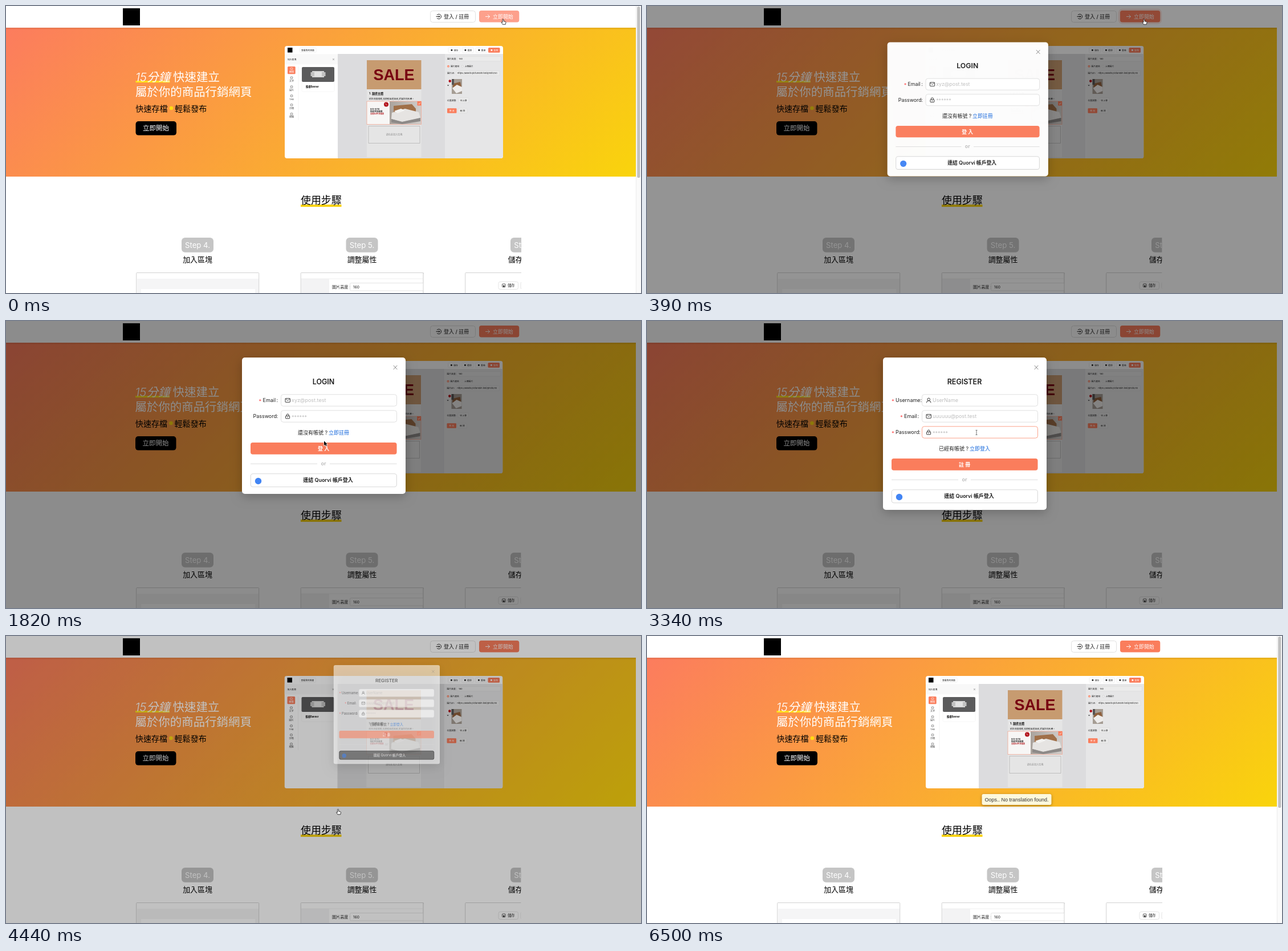
Recreate the animation shown at these times as an HTML page with a canvas. Size 1114x503 px, loop 8000 ms.

```html
<!DOCTYPE html>
<html lang="zh-Hant">
<head>
<meta charset="utf-8">
<title>Login and register</title>
<style>
html, body { margin: 0; width: 100%; height: 100%; overflow: hidden; background: #fff; }
canvas { display: block; width: 100%; height: 100%; }
</style>
</head>
<body>
<canvas id="stage" width="1114" height="503"></canvas>
<script>
const W = 1114, H = 503, LOOP = 8000;
const ctx = document.getElementById('stage').getContext('2d');
const SANS = 'Inter, "Noto Sans CJK TC", "Noto Sans CJK", sans-serif';
const ARIAL = '"Liberation Sans", Arial, sans-serif';
const CORAL = [250, 125, 92], WHITE = [255, 255, 255], GREY = [217, 217, 217], DARK = [51, 51, 51];
const LOCK_ON = 205, REGISTER_AT = 3010, CLOSE_AT = 4340, LOCK_OFF = 4590, TIP_AT = 4600;

const clamp = v => Math.max(0, Math.min(1, v));
const ramp = (t, from, len) => clamp((t - from) / len);
const hover = (t, on, off, len = 200) => Math.min(ramp(t, on, len), 1 - ramp(t, off, len));
const rgb = c => `rgb(${c.map(Math.round)})`;
const mix = (a, b, k) => rgb(a.map((v, i) => v + (b[i] - v) * k));

function rect(x, y, w, h, fill) {
  ctx.fillStyle = fill;
  ctx.fillRect(x, y, w, h);
}

function box(x, y, w, h, r, fill, stroke, lw = 0.8) {
  ctx.beginPath();
  ctx.roundRect(x, y, w, h, r);
  if (fill) { ctx.fillStyle = fill; ctx.fill(); }
  if (stroke) { ctx.strokeStyle = stroke; ctx.lineWidth = lw; ctx.stroke(); }
}

function dot(x, y, r, fill, stroke) {
  ctx.beginPath();
  ctx.arc(x, y, r, 0, 7);
  if (fill) { ctx.fillStyle = fill; ctx.fill(); }
  if (stroke) { ctx.strokeStyle = stroke; ctx.stroke(); }
}

// Each part is a flat list x, y, x, y, ...
function lines(color, lw, ...parts) {
  ctx.strokeStyle = color;
  ctx.lineWidth = lw;
  ctx.beginPath();
  for (const p of parts)
    for (let i = 0; i < p.length; i += 2) ctx[i ? 'lineTo' : 'moveTo'](p[i], p[i + 1]);
  ctx.stroke();
}

function poly(fill, ...p) {
  ctx.beginPath();
  for (let i = 0; i < p.length; i += 2) ctx.lineTo(p[i], p[i + 1]);
  ctx.closePath();
  ctx.fillStyle = fill;
  ctx.fill();
}

// y is the optical centre of the line
function text(s, x, y, size, color = '#222', weight = 400, align = 'left', family = SANS) {
  ctx.font = `${weight} ${size}px ${family}`;
  ctx.textAlign = align;
  ctx.fillStyle = color;
  ctx.fillText(s, x, y + size * 0.37);
}

function arrowIcon(x, y, color) {
  lines(color, 0.9, [x, y, x + 7.5, y], [x + 4.2, y - 3.3, x + 7.5, y, x + 4.2, y + 3.3]);
}

function drawHeader(t) {
  rect(0, 0, 1105, 38, '#fff');
  box(205, 4, 30, 30, 0, '#000');

  box(744.5, 8.5, 79, 20, 4, '#fff', '#d9d9d9');
  ctx.strokeStyle = '#222';
  ctx.lineWidth = 1;
  ctx.beginPath();
  ctx.arc(759.3, 18.5, 4.2, -2.5, 2.5);
  ctx.stroke();
  lines('#222', 1, [754.5, 18.5, 761, 18.5], [759, 16.5, 761, 18.5, 759, 20.5]);
  text('登入 / 註冊', 768, 19, 9, '#222', 500);

  const wave = ramp(t, 70, 800);
  if (wave > 0 && wave < 1) {
    const g = 3.5 * ramp(t, 70, 350);
    box(830 - g, 8 - g, 70 + 2 * g, 20.5 + 2 * g, 4 + g, `rgba(250,125,92,${0.3 * (1 - wave)})`);
  }
  box(830, 8, 70.3, 20.5, 4, mix([253, 160, 140], CORAL, ramp(t, 70, 300)));
  arrowIcon(841, 18.5, '#fff');
  text('立即開始', 854, 19, 8.96, '#fff', 500);
}

function drawHero() {
  const g = ctx.createLinearGradient(211, -173, 894, 510);
  g.addColorStop(0, '#fc7c5e');
  g.addColorStop(1, '#f9d40c');
  rect(0, 38, 1105, 261, g);
  const shade = ctx.createLinearGradient(0, 38, 0, 42);
  shade.addColorStop(0, 'rgba(90,40,0,.16)');
  shade.addColorStop(1, 'rgba(90,40,0,0)');
  rect(0, 38, 1105, 4, shade);
}

function drawHeroText() {
  rect(227.5, 131, 60, 3.2, '#ffe01c');
  text('15', 227, 124, 20.5, '#fff', 'italic 300');
  text('分鐘', 247, 124, 20.5, '#fff', 'italic 300');
  text('快速建立', 293, 124, 20.5, '#fff');
  text('屬於你的商品行銷網頁', 227, 150, 20.45, '#fff');
  text('快速存檔', 227.3, 180, 14.1, '#000');
  dot(290, 179, 3.3, '#ffdb13');
  text('輕鬆發布', 296, 180, 14.1, '#000');
  box(227.5, 202, 71.5, 24.6, 5, '#000');
  text('立即開始', 263, 214, 11.5, '#fff', 500, 'center');
}

function drawBed() {
  const wall = ctx.createLinearGradient(673, 0, 729, 0);
  wall.addColorStop(0, '#aaa39d');
  wall.addColorStop(1, '#d2cecb');
  rect(673, 167, 55.5, 40, wall);
  poly('#a06f48', 680, 175, 712, 172, 719, 180, 719, 188, 680, 189);
  poly('#e6e4e2', 677, 187, 700, 180, 724, 186, 727, 196, 695, 203, 676, 198);
  poly('#8d8a88', 676, 198, 695, 203, 727, 196, 727, 202, 695, 207, 676, 204);
  poly('#f3f2f0', 681, 184, 693, 180, 700, 183, 687, 188);
}

function drawEditor() {
  ctx.save();
  ctx.beginPath();
  ctx.roundRect(489, 70, 383, 197, 4);
  ctx.clip();
  rect(489, 70, 383, 197, '#fff');
  rect(582, 84, 188, 183, '#dcdcde');
  rect(770, 84, 102, 183, '#e6e6e7');

  box(494, 73, 8.5, 8.5, 0, '#000');
  box(515.5, 73, 28.5, 8.5, 1.5, '#fff', '#e6e6e6', 0.5);
  text('查看我的頁面', 518, 77.3, 3.8, '#111', 500);
  [[776, '儲存'], [800, '還原'], [824, '重做'], [846, '發布']].forEach(([x, s], i) => {
    const main = i === 3, ink = main ? '#fff' : '#222';
    box(x, 73, 20.5, 8.7, 1.5, main ? rgb(CORAL) : '#fff', main ? '' : '#e2e2e2', 0.5);
    box(x + 4.5, 76, 2.8, 2.8, 0.7, ink);
    text(s, x + 9.5, 77.4, 3.9, ink, 500);
  });

  rect(489, 84.3, 93, 18, '#f8f8f8');
  text('加入區塊', 494, 93.3, 3.8, '#111', 500);
  lines('#777', 0.6, [573, 92, 576, 95], [576, 92, 573, 95]);
  lines('#eee', 0.7, [513, 106, 513, 200]);
  box(494, 106, 13.7, 13.3, 1.5, rgb(CORAL));
  ['輪播', '文字', '圖片', 'TAB', '分隔', '標題'].forEach((s, i) => {
    const y = 110 + i * 15.9, ink = i ? '#444' : '#fff';
    box(499.2, y - 1.8, 3.6, 3.2, 0.5, '', ink, 0.6);
    text(s, 501, y + 5.4, 4.1, ink, 400, 'center');
  });
  box(519, 107, 57, 43, 2, '#fff', '#f1f1f1', 0.6);
  box(519, 107, 57, 26, 2, '#5b5b5c');
  box(537, 114, 21, 11, 0.5, '#d6d6d6');
  rect(534.5, 116, 26, 7, '#c2c2c2');
  rect(541, 115.5, 13, 8, '#e3e3e3');
  text('輪播Banner', 526, 141.3, 4.2, '#111', 700);

  rect(633, 95, 95.5, 170, '#e5e5e5');
  rect(633, 95, 95.5, 51, '#c79b70');
  text('SALE', 680.5, 120.5, 27, '#780011', 700, 'center', ARIAL);
  text('1. 親膚主體', 637, 153.3, 5, '#111', 700);
  lines('#444', 0.4, [642, 156.8, 662, 156.8]);
  text('給您深度睡眠,長期輕盈透氣感,愛護您的肌膚。', 637, 162.5, 3.85, '#222');
  rect(633, 167, 40, 40, '#f7f6f5');
  text('9/2-9/10', 639, 180.3, 3.8, '#222', 700);
  text('指定家具優惠', 639, 185, 3.6, '#222', 700);
  text('全館$2件享優惠', 639, 189, 3.3, '#b4262a', 700);
  dot(667, 172.5, 4, '#b3131d');
  lines('#fff', 0.7, [665.5, 171, 668.5, 174]);
  drawBed();
  box(633, 167, 95.5, 40.5, 0, '', '#f2a18c', 0.7);
  rect(721.5, 167, 7, 7.5, rgb(CORAL));
  lines('#fff', 0.7, [723.3, 171, 724.7, 172.3, 727, 169.3]);
  box(636, 210.5, 90, 30, 0, '', '#a5a5a5', 0.6);
  text('請在此加入區塊', 681, 225.7, 4.1, '#8b8b8b', 400, 'center');

  text('圖片高度:', 774, 93, 3.8);
  box(791.5, 88.3, 77, 8.4, 1, '#ebebeb', '#d4d4d4', 0.5);
  text('160', 794.5, 92.6, 4);
  dot(776, 105.7, 1.9, rgb(CORAL));
  dot(776, 105.7, 0.7, '#fff');
  text('圖片連結', 780, 105.7, 3.8);
  ctx.lineWidth = 0.5;
  dot(800.5, 105.7, 1.8, '#eee', '#ccc');
  text('上傳圖片', 804.5, 105.7, 3.8);
  text('圖片url:', 774, 118, 3.8);
  box(790, 113.4, 76, 8.7, 1, '#ebebeb', '#d4d4d4', 0.5);
  text('https://assets.picturebin.test/photo/v0', 792, 117.7, 3.85);
  rect(782, 128, 18, 26, '#a69d94');
  poly('#8e5f3c', 784, 136, 797, 133, 799, 143, 784, 145);
  poly('#eeeceb', 783, 144, 791, 138, 800, 142, 800, 149, 790, 153);
  rect(782, 128, 4, 10, '#555');
  dot(778.8, 131.6, 2.3, '#b3131d');
  poly('#222', 774, 138.5, 777.2, 138.5, 775.6, 140.3);
  text('位置調整:', 774, 165.3, 3.8);
  box(793.5, 160.8, 18.5, 8.6, 1.2, '#ebebeb', '#d4d4d4', 0.5);
  text('往上移', 802.7, 165.2, 3.9, '#222', 400, 'center');
  box(774, 179.3, 16.5, 8.5, 1.2, rgb(CORAL));
  text('修 改', 782.2, 183.6, 3.9, '#fff', 500, 'center');
  box(793, 179.3, 16, 8.5, 1.2, '#ebebeb', '#d4d4d4', 0.5);
  text('刪 除', 801, 183.6, 3.9, '#222', 400, 'center');
  ctx.restore();
}

function drawSteps(right) {
  rect(517, 348, 71.5, 4, '#f9d30f');
  text('使用步驟', 517, 340, 17.95, '#000');

  ctx.save();
  ctx.beginPath();
  ctx.rect(205, 390, right - 205, 113);
  ctx.clip();
  ['加入區塊', '調整屬性', '儲存並發布'].forEach((title, i) => {
    const x = 336 + i * 288.5;
    box(x - 28, 406, 56, 25.7, 6, '#c5c5c5');
    text(`Step ${i + 4}.`, x, 419, 13.2, '#fff', 400, 'center');
    text(title, x, 444.3, 12.9, '#000', 400, 'center');
    box(x - 107.3, 467.5, 215, 60, 1, '#fff', '#d2d2d2', 1);
  });
  rect(229.5, 478, 213.5, 30, '#f5f5f6');
  rect(237, 496, 200, 10, '#fff');
  rect(518, 478, 49, 30, '#f3f3f4');
  lines('#ececec', 0.8, [518, 478, 731, 478]);
  text('圖片高度 :', 572, 492, 7.1, '#222', 500);
  box(603.5, 485.5, 150, 13.5, 2, '#fff', '#d9d9d9', 0.7);
  rect(732, 470, 30, 33, '#fff');
  lines('#d2d2d2', 1, [732, 467, 732, 503]);
  text('160', 609, 492.2, 6.6);
  box(864, 483.3, 34.5, 13.3, 3, '#fff', '#d9d9d9', 0.7);
  box(870.5, 487, 5.6, 5.6, 1, '', '#333', 0.8);
  rect(872, 489.5, 2.6, 3, '#333');
  text('儲存', 880, 490, 6.3, '#222', 500);
  box(903, 483.3, 34, 13.3, 3, '#fff', '#d9d9d9', 0.7);
  ctx.restore();
}

function drawPage(t) {
  const locked = t >= LOCK_ON && t < LOCK_OFF;
  rect(0, 0, W, H, '#fff');
  drawHero();
  drawHeader(t);
  ctx.save();
  if (locked) ctx.translate(-0.5, 0);
  drawHeroText();
  drawEditor();
  ctx.restore();
  drawSteps(locked ? 903.4 : 904);
  if (!locked) {
    rect(1105, 0, 9, H, '#fafafa');
    lines('#e6e6e6', 0.7, [1105.4, 0, 1105.4, H]);
    box(1107.2, 1, 5.2, 300, 2.6, '#c1c1c1');
  }
}

const icons = {
  mail(x, y) {
    box(x, y - 3.3, 8.4, 6.6, 0.6, '', '#222', 0.9);
    lines('#222', 0.8, [x + 0.5, y - 2.6, x + 4.2, y + 0.4, x + 7.9, y - 2.6]);
  },
  lock(x, y) {
    box(x + 0.6, y - 0.6, 7, 4.5, 0.5, '', '#222', 0.9);
    lines('#222', 0.9, [x + 2.2, y - 0.6, x + 2.2, y - 3, x + 3, y - 3.8, x + 5.2, y - 3.8, x + 6, y - 3, x + 6, y - 0.6]);
    lines('#222', 0.8, [x + 4.1, y + 0.8, x + 4.1, y + 2.4]);
  },
  user(x, y) {
    ctx.lineWidth = 0.9;
    dot(x + 4.2, y - 1.6, 2.3, '', '#222');
    ctx.beginPath();
    ctx.arc(x + 4.2, y + 4.4, 3.8, Math.PI, 0);
    ctx.stroke();
  }
};

function field(y, label, x, colon, icon, hint, required, k) {
  if (required) text('*', x - 7, y + 1.2, 9, '#ff4d4f', 500);
  text(label, x, y, 8.96);
  text(':', colon, y, 8.96);
  box(482.5, y - 10.2, 203, 20.4, 4, '#fff', mix(GREY, [250, 140, 110], k));
  icons[icon](490, y);
  text(hint, 501, y + (hint[0] === '*' ? 1.2 : 0), 8.96, '#bfbfbf');
}

function modalFoot(y, ask, link, action, btn, dark) {
  text(ask, 512, y, 9);
  text(link, 566, y, 9, '#1668dc');
  box(429, y + 17.6, 256.5, 20.6, 4, mix(CORAL, [255, 160, 135], btn));
  text(action, 557, y + 28.1, 8.96, '#fff', 600, 'center');
  lines('#d9d9d9', 0.9, [429, y + 54.8, 546, y + 54.8], [568, y + 54.8, 685.5, y + 54.8]);
  text('or', 557, y + 54, 9, '#bbb', 600, 'center');
  box(429.3, y + 72.3, 256, 23, 4, mix(WHITE, DARK, dark), mix(GREY, [0, 0, 0], dark), 1.1);
  dot(442.5, y + 85, 5.7, '#4285f4');
  text('連結 Quorvi 帳戶登入', 565, y + 83.5, 8.96, mix([30, 30, 30], WHITE, dark), 600, 'center');
}

function drawModal(t) {
  const register = t >= REGISTER_AT;
  ctx.save();
  ctx.shadowColor = 'rgba(0,0,0,.22)';
  ctx.shadowBlur = 18;
  ctx.shadowOffsetY = 5;
  box(414, 64, 287, register ? 267 : 239, 5, '#fff');
  ctx.restore();
  lines('#777', 0.9, [679.7, 77.9, 686.3, 84.9], [686.3, 77.9, 679.7, 84.9]);
  text(register ? 'REGISTER' : 'LOGIN', 557, 106, 12.5, '#1d1d1d', 600, 'center');
  if (register) {
    field(139, 'Username', 436, 479.5, 'user', 'UserName', true, 0);
    field(167, 'Email', 451, 474.5, 'mail', 'uuuuuu@post.test', true, 0);
    field(195, 'Password', 436, 477, 'lock', '******', true, hover(t, 3010, 3400));
    modalFoot(223.5, '已經有帳號 ?', '立即登入', '註 冊', hover(t, 3430, 3620, 150), ramp(t, 3850, 280));
  } else {
    field(139, 'Email', 450.5, 474.5, 'mail', 'xyz@post.test', true, hover(t, 2510, 2730));
    field(167, 'Password', 433.5, 474.5, 'lock', '******', false, hover(t, 2400, 2480, 100));
    modalFoot(195.5, '還沒有帳號 ?', '立即註冊', '登 入', hover(t, 1860, 2180), hover(t, 1200, 1400, 180));
  }
}

function drawOverlay(t) {
  if (t < LOCK_ON || t >= LOCK_OFF) return;
  const leave = ramp(t, CLOSE_AT, 220);
  const fadeOut = leave * leave * (3 - 2 * leave);
  const shown = (1 - (1 - ramp(t, LOCK_ON, 300)) ** 4) * (1 - fadeOut);
  rect(0, 0, W, H, `rgba(0,0,0,${0.45 * ramp(t, LOCK_ON, 200) * (1 - leave)})`);
  // The dialog grows out of the clicked button.
  const s = 0.2 + 0.8 * shown;
  ctx.save();
  ctx.globalAlpha = shown;
  ctx.translate(872, 27);
  ctx.scale(s, s);
  ctx.translate(-872, -27);
  drawModal(t);
  ctx.restore();
}

function drawTip() {
  ctx.save();
  ctx.shadowColor = 'rgba(0,0,0,.35)';
  ctx.shadowBlur = 5;
  ctx.shadowOffsetY = 1.5;
  box(587.5, 277, 122, 19, 3, '#fdf8dc');
  ctx.restore();
  text('Oops.. No translation found.', 592.5, 286.3, 9, '#333', 400, 'left', ARIAL);
}

const pointers = {
  arrow() {
    const p = new Path2D('M0 0V8L1.9 6.3L3.2 9.2L4.6 8.6L3.3 5.8H5.7Z');
    ctx.lineWidth = 1.2;
    ctx.strokeStyle = '#fff';
    ctx.stroke(p);
    ctx.fillStyle = '#000';
    ctx.fill(p);
  },
  hand() {
    const p = new Path2D('M-1 0Q0-1.2 1 0V3.2L4.4 4Q5 4.3 5 5.2L4.2 8.8H-.6L-3 5.2Q-3 4-1 5.2Z');
    ctx.fillStyle = '#fff';
    ctx.fill(p);
    ctx.lineWidth = 0.8;
    ctx.strokeStyle = '#111';
    ctx.stroke(p);
  },
  beam() {
    lines('#555', 0.8, [-1.5, -4, 1.5, -4], [0, -4, 0, 4], [-1.5, 4, 1.5, 4]);
  }
};

const path = [
  [0, 872, 23.5, 'hand'], [870, 872, 23.5, 'hand'], [950, 866, 30, 'arrow'],
  [1250, 600, 274, 'hand'], [1400, 562, 264, 'arrow'], [1660, 558, 210, 'arrow'],
  [1820, 558, 210, 'arrow'], [1900, 560, 222, 'hand'], [2180, 566, 244, 'arrow'],
  [2400, 572, 172, 'beam'], [2620, 576, 138, 'beam'], [2700, 576, 138, 'beam'],
  [2780, 577, 178, 'arrow'], [2850, 578, 195, 'hand'], [3010, 578, 195, 'beam'],
  [3340, 578, 195, 'beam'], [3430, 580, 232, 'hand'], [3620, 582, 268, 'arrow'],
  [3740, 582.5, 304, 'hand'], [4520, 582.5, 304, 'hand'], [4600, 581.5, 303.5, 'arrow']
];

function drawPointer(t) {
  if (t >= 6500) return;
  const i = path.findLastIndex(p => p[0] <= t);
  const a = path[i], b = path[i + 1] || a;
  const k = b === a ? 0 : (t - a[0]) / (b[0] - a[0]);
  ctx.save();
  ctx.translate(a[1] + (b[1] - a[1]) * k, a[2] + (b[2] - a[2]) * k);
  pointers[a[3]]();
  ctx.restore();
}

const start = performance.now();
function frame() {
  const t = (performance.now() - start) % LOOP;
  drawPage(t);
  drawOverlay(t);
  if (t >= TIP_AT) drawTip();
  drawPointer(t);
  requestAnimationFrame(frame);
}
frame();
</script>
</body>
</html>
```
